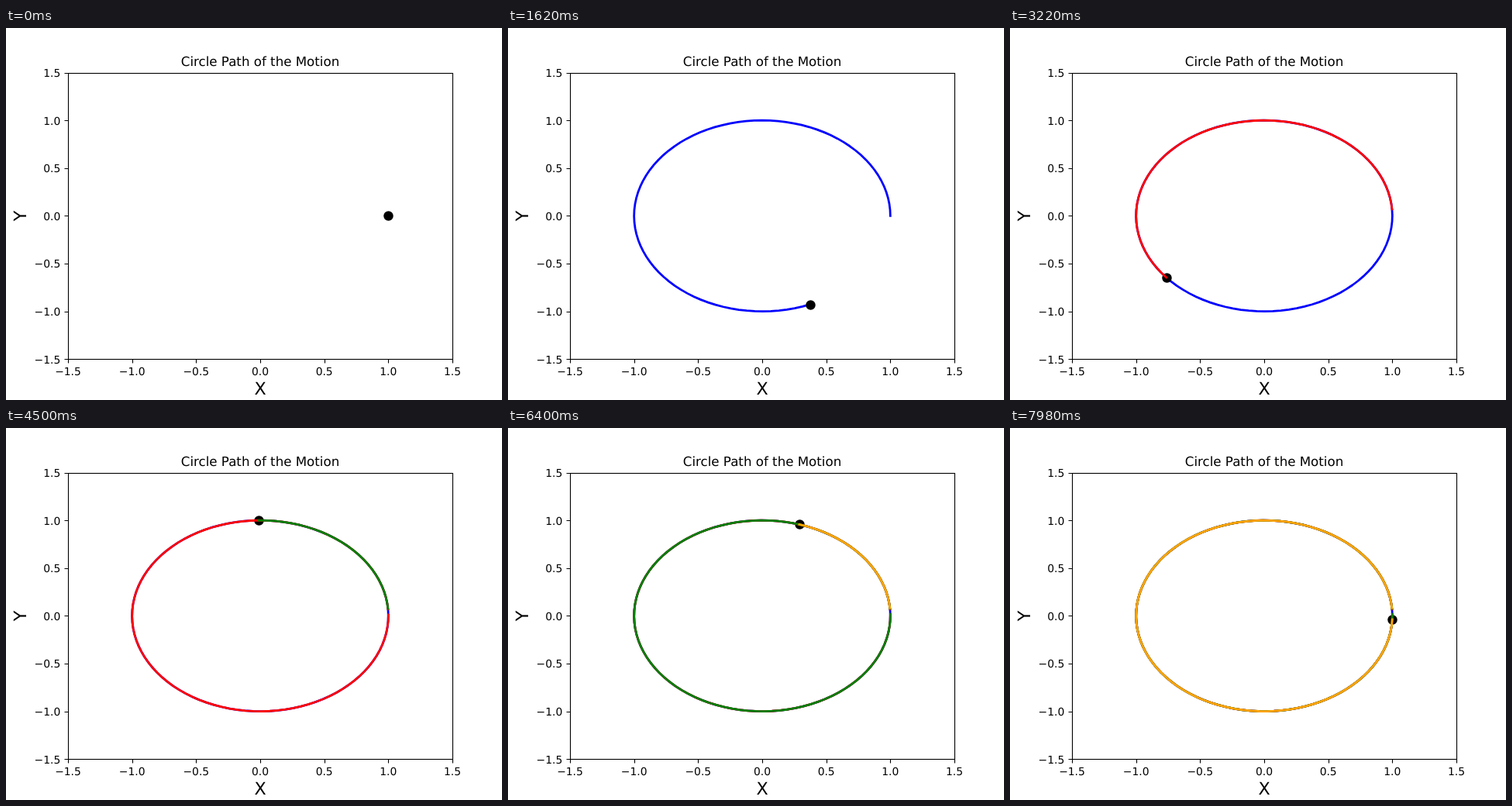
Animation, 640 px wide and 480 px high, one loop 8000 ms. Source, as an HTML page:

```html
<!DOCTYPE html>
<html lang="en">
<head>
<meta charset="utf-8">
<title>Circle Path of the Motion</title>
<style>
  html, body { margin: 0; width: 100%; height: 100%; overflow: hidden; background: #fff; }
  svg { display: block; width: 640px; height: 480px; }
  text { font-family: "DejaVu Sans", Verdana, sans-serif; font-size: 13.89px; text-rendering: geometricPrecision; }
  .middle { text-anchor: middle; }
  .end { text-anchor: end; }
  .title { font-size: 16.67px; }
  .label { font-size: 22.22px; }
  .axes { fill: none; stroke: #000; stroke-width: 1.11px; }
  .trail { fill: none; stroke-width: 2.78px; stroke-linejoin: round; stroke-linecap: square; }
</style>
</head>
<body>
<svg viewBox="0 0 640 480">
  <text class="title middle" x="328" y="49">Circle Path of the Motion</text>
  <text class="label middle" x="328" y="473">X</text>
  <text class="label middle" transform="translate(26 242.4) rotate(-90)">Y</text>
  <g id="ticks"></g>
  <path class="trail" stroke="blue"/>
  <circle id="dot" r="6.25"/>
  <path class="trail" stroke="red"/>
  <path class="trail" stroke="green"/>
  <path class="trail" stroke="orange"/>
  <rect class="axes" x="80.5" y="58.5" width="496" height="369"/>
</svg>
<script>
const FRAME_MS = 20, FRAMES = 400, LAP = 100;
const STEP = 20 * Math.PI / 999;

const toX = x => 328 + x * 496 / 3;
const toY = y => 242.4 - y * 369.6 / 3;
const snap = v => Math.round(v) + 0.5;
const point = i => [toX(Math.cos(i * STEP)), toY(Math.sin(i * STEP))];

function drawTicks() {
  let marks = "", labels = "";
  for (let k = -3; k <= 3; k++) {
    const value = k / 2;
    const name = value.toFixed(1).replace("-", "\u2212");
    const x = toX(value), y = toY(value);
    marks += `M${snap(x)} 427.5v5M80.5 ${snap(y)}h-5`;
    labels += `<text class="middle" x="${x}" y="448">${name}</text>` +
              `<text class="end" x="70.3" y="${Math.round(y + 5.3)}">${name}</text>`;
  }
  document.getElementById("ticks").innerHTML = `<path class="axes" d="${marks}"/>${labels}`;
}

const dot = document.getElementById("dot");
const trails = document.querySelectorAll(".trail");

// Each lap owns its samples; the first one also holds sample 0.
function trailPath(lap, frame) {
  const first = lap ? lap * LAP + 1 : 0;
  const last = Math.min(frame, (lap + 1) * LAP);
  const points = [];
  for (let i = first; i <= last; i++) points.push(point(i).map(v => v.toFixed(2)).join(" "));
  return points.length > 1 ? "M" + points.join("L") : "";
}

function draw(frame) {
  const [x, y] = point(frame);
  dot.setAttribute("cx", snap(x));
  dot.setAttribute("cy", snap(y));
  trails.forEach((trail, lap) => trail.setAttribute("d", trailPath(lap, frame)));
}

const start = performance.now();
let shown = 0;

function tick() {
  const frame = Math.floor((performance.now() - start) / FRAME_MS + 0.001) % FRAMES;
  if (frame !== shown) draw(shown = frame);
  requestAnimationFrame(tick);
}

drawTicks();
draw(0);
requestAnimationFrame(tick);
</script>
</body>
</html>
```
